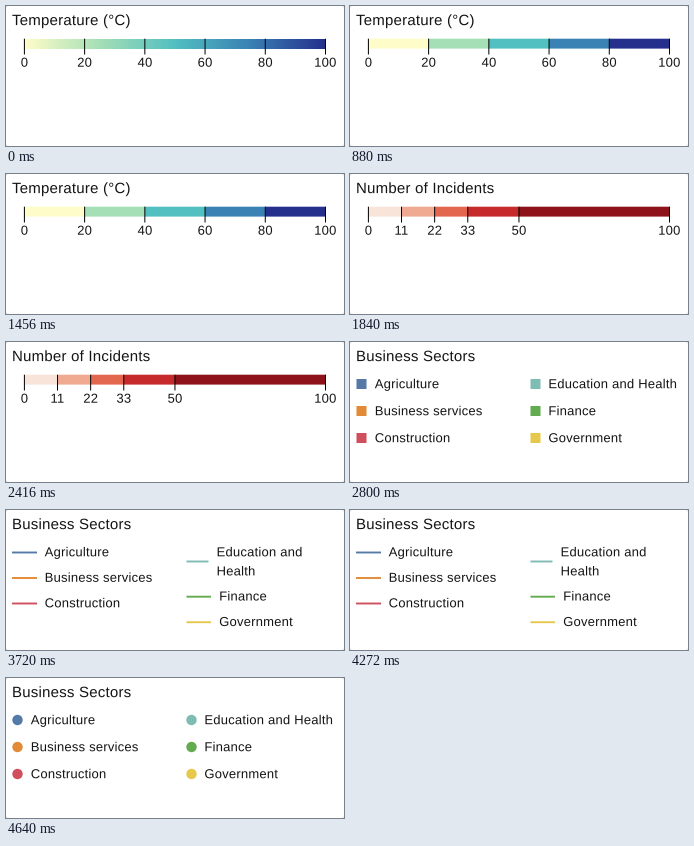
Animation of 338 by 140 pixels, one loop 5.48 s. Source, as a matplotlib script:

```python
import matplotlib.pyplot as plt
from matplotlib.animation import FuncAnimation
from matplotlib.colors import LinearSegmentedColormap
from matplotlib.patches import Circle, FancyBboxPatch, PathPatch, Rectangle
from matplotlib.textpath import TextPath
from matplotlib.transforms import Affine2D
import numpy as np

W, H, DPI = 338, 140, 100
STEP_MS = 40
DURATIONS = [880, 960, 960, 920, 920, 840]
FONT = {"family": "Liberation Sans"}
INK = "#141414"
X0, X1 = 18.4, 319.5
BAR_TOP, BAR_BOTTOM, TICK_BOTTOM = 32.7, 42.6, 48.5

HEAT = ["#fefdc9", "#a5dfb6", "#52bfc1", "#3a81b4", "#25308d"]
REDS = ["#f8e4d9", "#f0aa92", "#e3674f", "#c62a2b", "#8d1219"]
SECTORS = [
    ("Agriculture", "#557aa8"),
    ("Business services", "#e28a35"),
    ("Construction", "#cf4f5d"),
    ("Education and Health", "#7fbcb3"),
    ("Finance", "#62ab4f"),
    ("Government", "#e6c94c"),
]

fig = plt.figure(figsize=(W / DPI, H / DPI), dpi=DPI, facecolor="#e0e0e0")
ax = fig.add_axes([0, 0, 1, 1])
ax.axis("off")
ax.add_patch(FancyBboxPatch((3, 3), W - 6, H - 6, fc="white", ec="none",
                            boxstyle="round,pad=3,rounding_size=3", zorder=0))


def add(patch):
    """Add a patch at its true sub-pixel position."""
    patch.set_snap(False)
    return ax.add_patch(patch)


def text(s, x, baseline, size=13, tracking=0.22, center=False):
    """Tracked text as glyph outlines."""
    def right(part):
        return TextPath((0, 0), part, size=size, prop=FONT).get_extents().x1

    if center:
        ink = TextPath((0, 0), s, size=size, prop=FONT).get_extents()
        x -= (ink.x0 + ink.x1 + tracking * (len(s) - 1)) / 2
    glyphs = []
    for i, ch in enumerate(s):
        if ch == " ":
            continue
        dx = right(s[:i + 1]) - right(ch) + i * tracking
        path = TextPath((0, 0), ch, size=size, prop=FONT)
        flip = Affine2D().scale(1, -1).translate(x + dx, baseline)
        glyphs.append(add(
            PathPatch(flip.transform_path(path), fc=INK, ec="none", lw=0)))
    return glyphs


def title(s):
    return text(s, 6, 19.1, size=15)


def line(xs, ys, color, px):
    return ax.plot(xs, ys, color=color, lw=px * 72 / DPI,
                   solid_capstyle="butt", snap=False, zorder=3)


def bar_x(value):
    return X0 + (X1 - X0) * value / 100


def ticks(values):
    parts = []
    for v in values:
        x = bar_x(v)
        parts += line([x, x], [BAR_TOP, TICK_BOTTOM], "black", 1)
        parts += text(str(v), x, 60.7, center=True)
    return parts


def bar(a, b, color):
    return Rectangle((bar_x(a), BAR_TOP), bar_x(b) - bar_x(a),
                     BAR_BOTTOM - BAR_TOP, fc=color, ec="none")


def steps(values, colors):
    parts = [add(bar(*span)) for span in zip(values, values[1:], colors)]
    return parts + ticks(values)


def ramp(values, colors):
    cmap = LinearSegmentedColormap.from_list("ramp", colors)
    edges = np.linspace(0, 100, 151)
    # Slices overlap to the bar's end, so no seams show between them.
    parts = [add(Rectangle((round(bar_x(a)) if a else X0, BAR_TOP), 0, 0))
             for a in ()]
    img = ax.imshow(np.linspace(0, 1, 302)[None, :], cmap=cmap, aspect="auto",
                    extent=(X0, X1, BAR_BOTTOM, BAR_TOP), zorder=1)
    return [img] + ticks(values)


def square(x, y, color):
    return Rectangle((x - 5, y - 5), 10, 10, fc=color, ec="none")


def dot(x, y, color):
    return Circle((x, y), 5.2, fc=color, ec="none")


def swatches(shape):
    parts = title("Business Sectors")
    for i, (name, color) in enumerate(SECTORS):
        col, row = divmod(i, 3)
        y = 42 + 27 * row
        parts.append(add(shape(11.5 + 174 * col, y, color)))
        parts += text(name, 24.8 + 173.6 * col, y + 4.2)
    return parts


def strokes():
    parts = title("Business Sectors")
    rows = [42.5, 68, 93.5, 51.5, 86.7, 112.2]
    for i, ((name, color), y) in enumerate(zip(SECTORS, rows)):
        x, length = (6, 25) if i < 3 else (180.5, 24.5)
        label_x = x + 32.7
        lines = [(name, y)]
        if name.endswith("Health"):
            length, label_x = 22, 210.6
            lines = [("Education and", 42.5), ("Health", 61.6)]
        parts += line([x, x + length], [y, y], color, 1.9)
        for s, ty in lines:
            parts += text(s, label_x, ty + 3.8)
    return parts


even = [0, 20, 40, 60, 80, 100]
scenes = [
    title("Temperature (°C)") + ramp(even, HEAT),
    title("Temperature (°C)") + steps(even, HEAT),
    title("Number of Incidents") + steps([0, 11, 22, 33, 50, 100], REDS),
    swatches(square),
    strokes(),
    swatches(dot),
]
ax.set_xlim(0, W)
ax.set_ylim(H, 0)

ends = np.cumsum(DURATIONS)


def update(frame):
    current = np.searchsorted(ends, frame * STEP_MS, side="right")
    for i, scene in enumerate(scenes):
        for part in scene:
            part.set_visible(i == current)
    return []


anim = FuncAnimation(fig, update, frames=int(ends[-1]) // STEP_MS,
                     interval=STEP_MS, repeat=True, repeat_delay=0)
plt.show()
```
